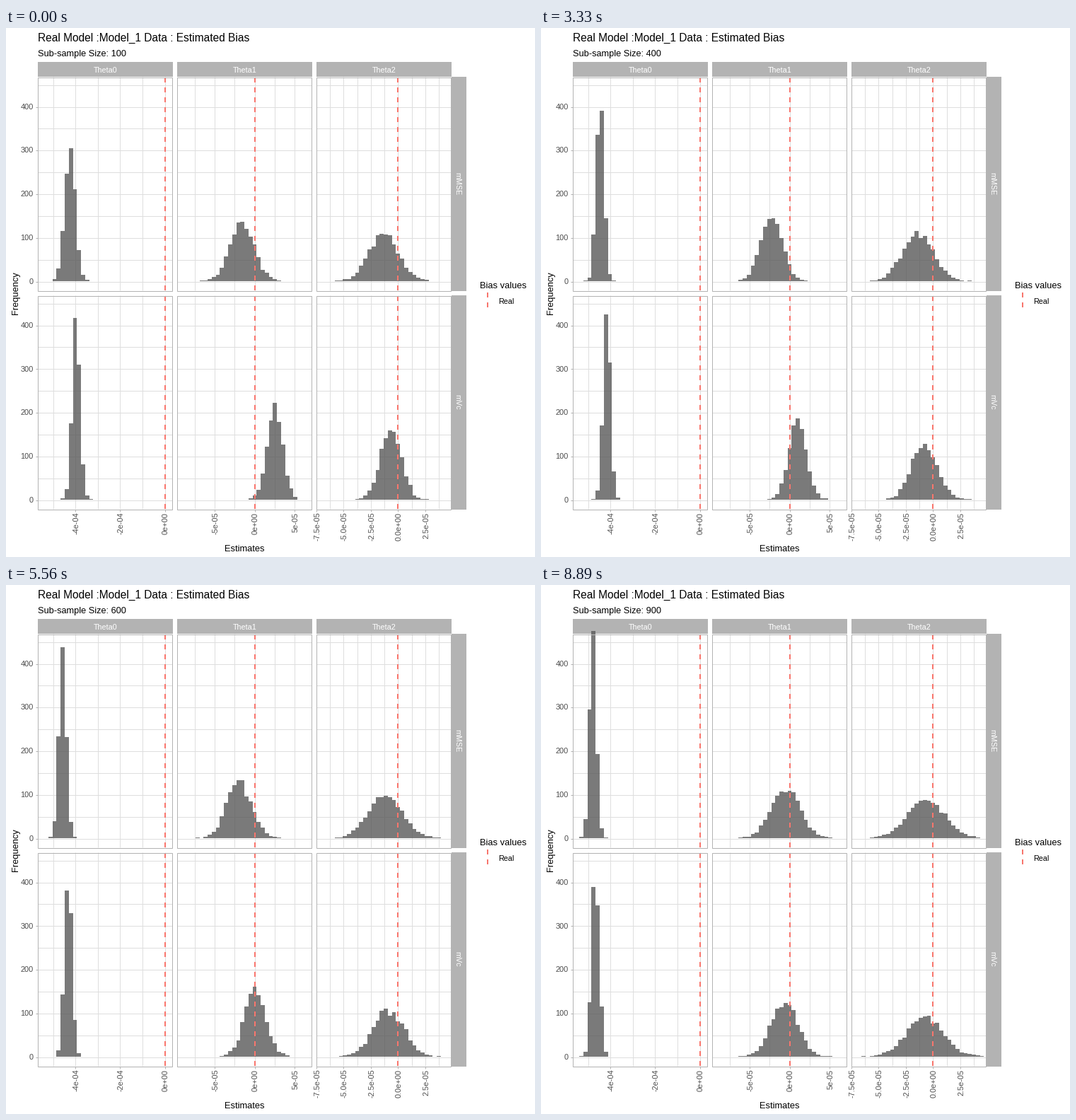
Write a matplotlib script that moves like this. It is 748 px wide and 748 px high and loops after 10 s.

```python
import matplotlib.pyplot as plt
import numpy as np
from matplotlib.animation import FuncAnimation
from matplotlib.patches import Polygon, Rectangle

SIZE, DPI = 748, 64
PT = 72 / DPI                      # points per pixel
STATES, FRAMES, LOOP = 9, 200, 10000
BIN = 5.775                        # bar width in pixels
UNIT = 0.618                       # pixels per count
BINS = np.arange(-29, 13)          # bin 0 is centred on zero
GREY, GRID, INK, RED = "#b3b3b3", "#dedede", "#4d4d4d", "#F8766D"

plt.rcParams["font.family"] = "Liberation Sans"
rng = np.random.default_rng(7)

# name, left, right, x of zero, tick step, tick range, label format
COLS = [
    ("Theta0", 45, 235, 224.5, 63.1, range(-2, 1), lambda k: f"{k * 2e-4:.0e}"),
    ("Theta1", 242, 432, 351.5, 56.2, range(-1, 2), lambda k: f"{k * 5e-5:.0e}"),
    ("Theta2", 439, 629, 554.3, 38.5, range(-3, 2), lambda k: f"{k * 2.5e-5:.1e}"),
]
# name, top, bottom, y of zero
ROWS = [("mMSE", 69, 371, 357.7), ("mVc", 378, 680, 666.7)]

# Key points of the drifting mean and spread, in bins
MEAN_AT, DEV_AT = (0, 1, 4, 7, 8), (0, 1, 8)
DRIFT = {
    (0, 0): ((-23.2, -23.8, -24.7, -25.7, -26.15), (1.3, 1.0, 0.86)),
    (0, 1): ((-3.05, -4.15, -4.5, -2.6, -1.1), (2.95, 2.3, 3.5)),
    (0, 2): ((-3.4, -3.9, -3.45, -2.3, -1.7), (3.6, 3.35, 4.6)),
    (1, 0): ((-21.75, -22.1, -23.1, -24.7, -25.55), (0.97, 0.9, 0.95)),
    (1, 1): ((5.0, 3.95, 0.95, -1.4, -1.2), (1.9, 1.7, 3.3)),
    (1, 2): ((-1.7, -1.75, -2.35, -2.4, -1.9), (2.5, 2.6, 4.5)),
}


def counts(state, means, devs):
    """Histogram of 1000 bell-shaped estimates with a little sampling noise."""
    mean = np.interp(state, MEAN_AT, means)
    dev = np.interp(state, DEV_AT, devs)
    n = 1000 / (dev * np.sqrt(2 * np.pi)) * np.exp(-((BINS - mean) / dev) ** 2 / 2)
    n += 0.5 * np.sqrt(n) * rng.standard_normal(len(n))
    return np.maximum(np.round(n), 0)


def outline(n, x0, y0):
    """Stepped outline of a histogram in pixels."""
    edges = np.round(x0 + (np.append(BINS, BINS[-1] + 1) - 0.5) * BIN)
    tops = np.round(y0 - n * UNIT)
    base = round(y0)
    ys = np.concatenate([[base], np.repeat(tops, 2), [base]])
    return np.column_stack([np.repeat(edges, 2), ys])


fig = plt.figure(figsize=(SIZE / DPI, SIZE / DPI), dpi=DPI, facecolor="white")
ax = fig.add_axes([0, 0, 1, 1])
ax.set(xlim=(0, SIZE), ylim=(SIZE, 0))
ax.axis("off")


def pixel(v):
    """Centre of the nearest pixel."""
    return np.floor(np.asarray(v) + 0.5) + 0.5


def hlines(ys, x1, x2, color):
    ax.hlines(pixel(ys), x1, x2, colors=color, lw=PT, zorder=1)


def vlines(xs, y1, y2, color):
    ax.vlines(pixel(xs), y1, y2, colors=color, lw=PT, zorder=1)


def dashed(x, bottom, top):
    x = np.floor(x + 0.5)
    ax.plot([x, x], [bottom, top], color=RED, lw=2 * PT, ls=(0, (3.5, 3.5)), zorder=4)


def text(x, y, s, px, color="black", ha="left", rot=0):
    return ax.text(x, y, s, fontsize=px * PT, color=color, ha=ha, va="baseline",
                   rotation=rot, rotation_mode="anchor", zorder=6)


def strip(x, y, w, h):
    ax.add_patch(Rectangle((x, y), w, h, fc=GREY, lw=0, zorder=2))


bars, shapes = {}, {}
for r, (row, top, bottom, y0) in enumerate(ROWS):
    ticks = y0 - np.arange(0, 401, 100) * UNIT
    hlines(ticks, 42, 45, GREY)
    for i, y in enumerate(ticks):
        text(39, y + 4.2, str(100 * i), 11, INK, "right")

    for c, (_, left, right, x0, step, _, _) in enumerate(COLS):
        xs = x0 + np.arange(-8, 9) * step / 2
        hlines(y0 - np.arange(0, 451, 50) * UNIT, left, right, GRID)
        vlines(xs[(xs > left + 2) & (xs < right - 2)], top, bottom, GRID)
        shapes[r, c] = [outline(counts(s, *DRIFT[r, c]), x0, y0) for s in range(STATES)]
        bars[r, c] = ax.add_patch(Polygon(shapes[r, c][0], fc="#595959", alpha=0.8,
                                          lw=0, zorder=3, antialiased=False))
        dashed(x0, bottom, top)
        ax.add_patch(Rectangle((left + 0.5, top + 0.5), right - left, bottom - top,
                               fill=False, ec=GREY, lw=PT, zorder=5))
    strip(630, top, 21, bottom - top + 1)
    text(635, (top + bottom) / 2, row, 10.7, "white", "center", 270)

for name, left, right, x0, step, ticks, label in COLS:
    strip(left, 48, right - left + 1, 21)
    text((left + right + 1) / 2, 63, name, 10.7, "white", "center")
    for k in ticks:
        x = x0 + k * step
        vlines([x], 681, 684, GREY)
        text(x + 4.5, 684.5, label(k), 11, INK, "right", 90)

text(45, 19, "Real Model :Model_1 Data : Estimated Bias", 15.5)
subtitle = text(45, 40, "", 12.7)
text(337, 740, "Estimates", 12.9, ha="center")
text(17, 375, "Frequency", 12.9, ha="center", rot=90)
text(670, 368, "Bias values", 12.9)
text(696, 390, "Real", 10.7)
dashed(681, 395, 374)


def update(i):
    state = (STATES * (i + 1) - 1) // FRAMES
    subtitle.set_text(f"Sub-sample Size: {100 * (state + 1)}")
    for key, patch in bars.items():
        patch.set_xy(shapes[key][state])
    return [subtitle, *bars.values()]


anim = FuncAnimation(fig, update, frames=FRAMES, interval=LOOP / FRAMES, repeat=True,
                     repeat_delay=0, blit=False)
plt.show()
```
